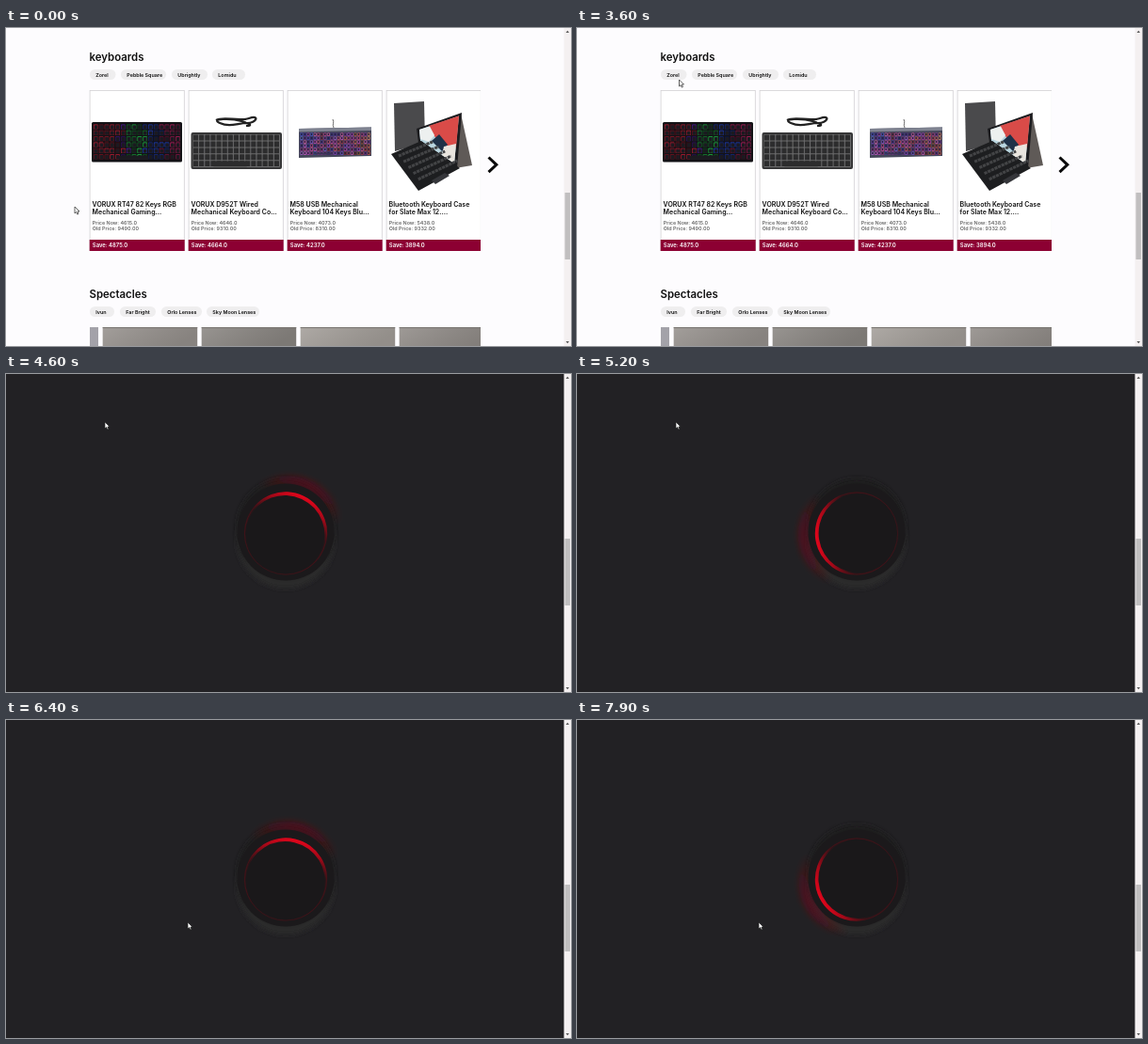
Write an HTML page that moves like this. It is 600 px wide and 338 px high and loops after 8000 ms.

```html
<!DOCTYPE html>
<html lang="en">
<head>
<meta charset="utf-8">
<title>Shop page and loader</title>
<style>
  html, body { margin: 0; width: 100%; height: 100%; overflow: hidden; background: #fdfcfe; }
  svg { display: block; width: 100vw; height: 100vh; }
  text { font-family: Inter, Roboto, sans-serif; font-weight: 600; fill: #111; }
  .head { font-size: 11.4px; }
  .pill { font-size: 5.4px; }
  .title { font-size: 7px; }
  .price { font-size: 5.4px; fill: #686868; }
  .save { font-size: 5.9px; fill: #fff; }
</style>
</head>
<body>
<svg viewBox="0 0 600 338" preserveAspectRatio="none">
  <defs>
    <clipPath id="row"><path d="M88 60H504V338H88Z"/></clipPath>
    <filter id="soft" x="-30%" y="-30%" width="160%" height="160%"><feGaussianBlur stdDeviation="2.5"/></filter>
    <filter id="haze" x="-30%" y="-30%" width="160%" height="160%"><feGaussianBlur stdDeviation="3"/></filter>
    <linearGradient id="arc">
      <stop offset=".6" stop-color="#7d0712" stop-opacity=".15"/>
      <stop offset=".84" stop-color="#b00718" stop-opacity=".9"/>
      <stop offset="1" stop-color="#e3051b"/>
    </linearGradient>
    <linearGradient id="glow">
      <stop offset=".74" stop-color="#7a0a14" stop-opacity="0"/>
      <stop offset="1" stop-color="#7a0a14" stop-opacity=".55"/>
    </linearGradient>
    <linearGradient id="shade" x2="1" y2=".3">
      <stop stop-color="#fff" stop-opacity=".12"/><stop offset="1" stop-color="#000" stop-opacity=".1"/>
    </linearGradient>
  </defs>
  <g id="page"></g>
  <g id="loader">
    <path d="M0 0H600V338H0Z" fill="#222124"/>
    <circle cx="297" cy="176" r="52" fill="#29292a" filter="url(#soft)"/>
    <circle cx="297" cy="163" r="52" fill="#1c1b1d" filter="url(#soft)"/>
    <g class="spin"><circle cx="304" cy="169.5" r="55" fill="url(#glow)" filter="url(#haze)"/></g>
    <circle cx="297" cy="168" r="51.5" fill="#1b191b"/>
    <circle cx="297" cy="169.5" r="43.5" fill="#1a181a" stroke="#65101a" stroke-opacity=".5" stroke-width=".8"/>
    <g class="spin"><path id="crescent" fill="url(#arc)" fill-rule="evenodd"/></g>
  </g>
  <g id="bar">
    <path d="M592.5 0H600V338H592.5Z" fill="#f4f0f1"/>
    <path d="M593.5 175H599V246H593.5Z" fill="#c1bfc0"/>
    <path d="M594.5 5L596.3 2.8 598 5ZM594.5 333L596.3 335.2 598 333Z" fill="#555"/>
  </g>
  <path id="cursor" d="M0 0V7L1.6 5.6 2.8 8.1 3.9 7.6 2.9 5H5Z" fill="#fff" stroke="#222" stroke-width=".7"/>
</svg>
<script>
const $ = id => document.getElementById(id);
let seed = 7;
const rnd = () => (seed = seed * 16807 % 2147483647) / 2147483647;

const text = (kind, x, y, s) => `<text class="${kind}" x="${x}" y="${y}">${s}</text>`;
const rect = (x, y, w, h, fill, r = 0) =>
  `<rect x="${x}" y="${y}" width="${w}" height="${h}" rx="${r}" fill="${fill}"/>`;
const shape = (d, fill) => `<path d="${d}" fill="${fill}"/>`;
const line = (d, color, w) => `<path d="${d}" fill="none" stroke="${color}" stroke-width="${w}"/>`;

// Grid of keys; color(u) takes the column as 0..1
function keys(x, y, w, h, cols, rows, color, gap = 1) {
  const dx = w / cols, dy = h / rows;
  let out = '';
  for (let r = 0; r < rows; r++)
    for (let c = 0; c < cols; c++)
      out += rect((x + c * dx).toFixed(1), (y + r * dy).toFixed(1),
        (dx - gap).toFixed(1), (dy - gap).toFixed(1), color(c / (cols - 1)), .5);
  return out;
}

function rgbBoard() {
  const hue = u => u < .3 ? 352 : u < .4 ? 265 : u < .6 ? 135 : u < .84 ? 228 : 335;
  const glow = u => `hsl(${hue(u + rnd() * .12 - .06)} 75% ${(14 + rnd() * 32).toFixed()}%)`;
  return rect(91, 100, 96, 42.5, '#131216', 1.5)
    + keys(93, 102.5, 93, 38, 16, 6, glow, 1.2)
    + keys(93.6, 103.2, 93, 38, 16, 6, () => '#1b1a20', 2.1)
    + rect(120, 136, 31, 4, '#1b1a20', .5);
}

function wiredBoard() {
  return line('M223 98C232 93 246 100 258 96S266 101 256 101 238 106 227 101 240 96 250 99 262 104 255 104', '#222', 2.2)
    + rect(196.5, 111, 96.5, 39, '#363637', 2)
    + rect(198.5, 113, 92.5, 35, '#6a6a6b', 1)
    + keys(199, 113.6, 92, 34.5, 15, 5, () => '#2c2c2d', 1)
    + rect(220, 141.4, 36, 5.8, '#2c2c2d', .6);
}

function steelBoard() {
  const tint = u => `hsl(${(215 + u * 70 + rnd() * 110).toFixed()} 52% ${(30 + rnd() * 28).toFixed()}%)`;
  return line('M348 106C346 102 349 101 347 97', '#444', .8)
    + shape('M311 107L388 105.5V136L311 138Z', '#444659')
    + shape('M311 107L388 105.5V109L311 110.5Z', '#7e8290')
    + keys(312.5, 111.5, 75, 24, 21, 6, tint, .8)
    + keys(313, 112.1, 75, 24, 21, 6, () => '#26263a', 2)
    + rect(327, 132.5, 20, 2, '#393455');
}

function folioCase() {
  let rows = '';
  for (let i = 0; i < 5; i++)
    rows += line(`M${417 + i * 5.2} ${136 + i * 6.2}l${36 + i * 1.4} ${-15 - i * 1.2}" stroke-dasharray="3.2 .8`, '#434446', 3);
  return shape('M412 80L444 78 445 122 413 131Z', '#4a4a4c')
    + shape('M483 91L495 146 477 149Z', '#5f5a57')
    + shape('M436 107L484 90 479 149 438 122Z', '#1c1c1f')
    + shape('M439 108L481 93.5 476 144 440 120Z', '#b9d5df')
    + shape('M449 104L481 93.5 478 127 463 124 455 115Z', '#d94b48')
    + shape('M439 108L450 104.5 455 114 449 121 440 118Z', '#edf0ef')
    + shape('M452 120L460 113 469 124 463 131Z', '#1f3148')
    + shape('M465 126L478 123 476 144 463 135Z', '#e9e5df')
    + shape('M409 134L441 120 482 149 438 173Z', '#1d1e20')
    + rows
    + shape('M452 162L466 154 471 157 456 166Z', '#35363a');
}

function card(x, image, title, prices) {
  const [now, old, save] = prices;
  return rect(x - .3, 66, 101, 171, '#d2d0d3') + rect(x + .5, 66.8, 99.4, 169, '#fff')
    + image()
    + title.map((s, i) => text('title', x + 2.6, 189.5 + i * 8.6, s)).join('')
    + text('price', x + 2.8, 208.8, `Price Now: ${now}`)
    + text('price', x + 2.8, 215.4, `Old Price: ${old}`)
    + rect(x - .3, 225, 101, 12, '#8c0032')
    + text('save', x + 2.8, 233.3, `Save: ${save}`);
}

const pills = (y, list) => list.map(([x, w, s]) =>
  rect(x, y, w, 11, '#efeeef', 5.5) + text('pill', x + 6.3, y + 7.6, s)).join('');

const shelf = (x, color) => rect(x, 318, 100.5, 20, color) + rect(x, 318, 100.5, 20, 'url(#shade)')
  + rect(x, 318, 100.5, 1, '#77736f');

$('page').innerHTML = rect(0, 0, 600, 338, '#fdfcfe')
  + text('head', 88.6, 34.6, 'keyboards')
  + pills(44, [[89, 27.5, 'Zorel'], [122, 48, 'Pebble Square'], [176, 38, 'Ubrightly'], [219, 35, 'Lomidu']])
  + '<g clip-path="url(#row)">'
  + card(89, rgbBoard, ['VORUX RT47 82 Keys RGB', 'Mechanical Gaming...'], ['4615.0', '9490.00', '4875.0'])
  + card(194, wiredBoard, ['VORUX D952T Wired', 'Mechanical Keyboard Co...'], ['4646.0', '9310.00', '4664.0'])
  + card(299, steelBoard, ['M58 USB Mechanical', 'Keyboard 104 Keys Blu...'], ['4073.0', '8310.00', '4237.0'])
  + card(404, folioCase, ['Bluetooth Keyboard Case', 'for Slate Max 12....'], ['5438.0', '9332.00', '3894.0'])
  + rect(89, 318, 9, 20, '#a3a2a9')
  + shelf(102.7, '#96918d') + shelf(207.7, '#8a8682') + shelf(312.7, '#a39e99') + shelf(417.7, '#918c88')
  + '</g>'
  + line('M512.5 137.5L520.8 145.3 512.5 153.2', '#0b0b0b', 3)
  + text('head', 88.6, 287, 'Spectacles')
  + pills(296, [[89, 26, 'Ivun'], [121, 38, 'Far Bright'], [165, 43, 'Orlo Lenses'], [213, 56, 'Sky Moon Lenses']]);

const ring = (x, r) => `M${x - r} 169.5a${r} ${r} 0 1 0 ${2 * r} 0a${r} ${r} 0 1 0 ${-2 * r} 0Z`;
$('crescent').setAttribute('d', ring(297, 44.2) + ring(295.2, 42.2));

// Pointer stops: time, x, y
const stops = [
  [300, 73, 190], [800, 68, 140], [1200, 72, 91], [1600, 95.7, 61.3], [1800, 95.7, 61.3],
  [2500, 25, 126], [3000, 25, 126], [3100, 20, 124], [3600, 108.5, 55], [3900, 105, 51],
  [5300, 105, 51], [5400, 112, 75], [5500, 146, 135], [5600, 173, 180], [5700, 187, 201], [5900, 193, 215]
];

function pointer(t) {
  const i = stops.findIndex(s => s[0] > t);
  if (i < 1) return (i ? stops.at(-1) : stops[0]).slice(1);
  const [a, b] = [stops[i - 1], stops[i]];
  const p = (t - a[0]) / (b[0] - a[0]), e = p * p * (3 - 2 * p);
  return [a[1] + (b[1] - a[1]) * e, a[2] + (b[2] - a[2]) * e];
}

const LOOP = 8000, STEP = 100, LOAD = 4600, TURN = 915;
const spinners = document.querySelectorAll('.spin');
const start = performance.now();

function draw() {
  const t = Math.floor((performance.now() - start) % LOOP / STEP) * STEP;
  $('loader').style.display = t < LOAD ? 'none' : '';
  const angle = (t - LOAD) / TURN * 360 - 65;
  spinners.forEach(s => s.setAttribute('transform', `rotate(${angle} 297 169.5)`));
  $('cursor').setAttribute('transform', `translate(${pointer(t)})`);
  requestAnimationFrame(draw);
}
draw();
</script>
</body>
</html>
```
